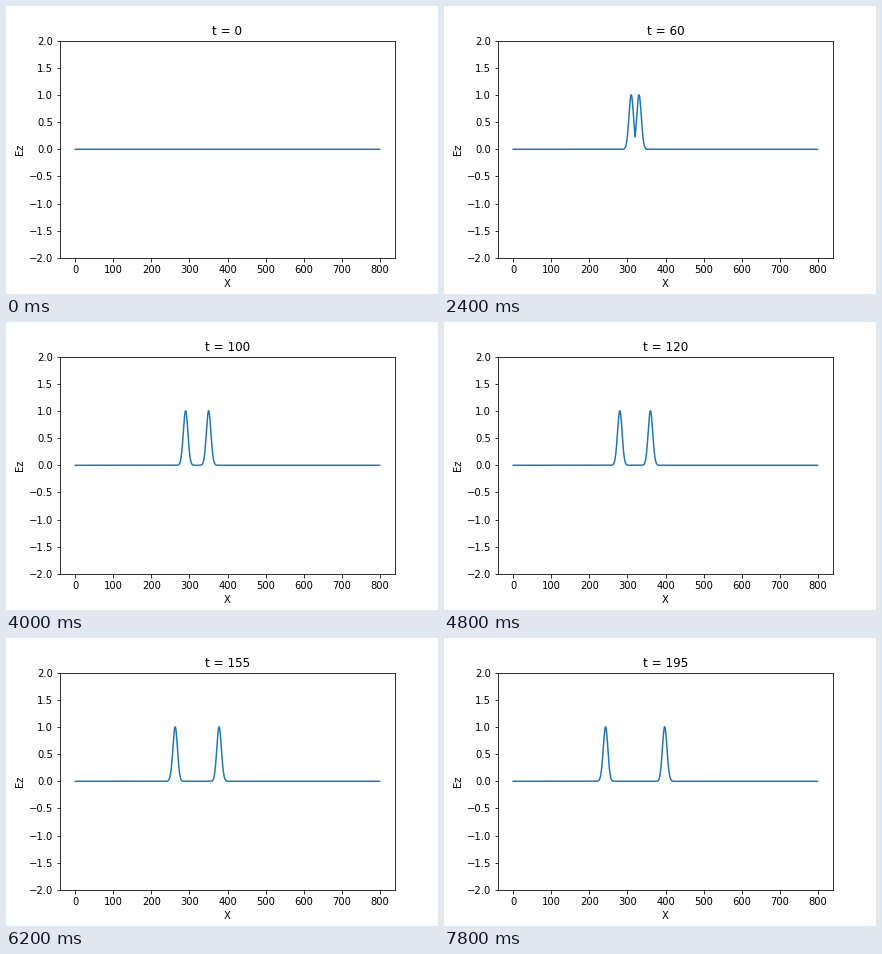
A matplotlib script that plays this animation: 432 px wide and 288 px high, repeating every 8 s.

```python
import numpy as np
import matplotlib.pyplot as plt
from matplotlib.animation import FuncAnimation

CELLS = 800        # grid size
SOURCE = 320       # cell where the pulse is injected
T0, SPREAD = 40, 12
STRIDE = 5         # time steps per frame
FRAMES = 40


def simulate():
    """1D FDTD run with a soft Gaussian source; one Ez row per frame."""
    ez = np.zeros(CELLS)
    hy = np.zeros(CELLS)
    rows = []
    for t in range(FRAMES * STRIDE):
        ez[1:] += 0.5 * (hy[:-1] - hy[1:])
        ez[SOURCE] += np.exp(-0.5 * ((T0 - t) / SPREAD) ** 2)
        hy[:-1] += 0.5 * (ez[:-1] - ez[1:])
        if t % STRIDE == 0:
            rows.append(ez.copy())
    return rows


plt.rcParams.update({
    "font.family": "DejaVu Sans",
    "font.size": 10,
    "figure.subplot.bottom": 0.125,
})

fields = simulate()
fig, ax = plt.subplots(figsize=(6, 4), dpi=72)
line, = ax.plot(np.arange(CELLS), fields[0], color="#1f77b4", lw=1.5)
ax.set_ylim(-2, 2)
ax.set_xlabel("X")
ax.set_ylabel("Ez")
title = ax.set_title("t = 0")


def update(i):
    line.set_ydata(fields[i])
    title.set_text(f"t = {i * STRIDE}")
    return line, title


anim = FuncAnimation(fig, update, frames=FRAMES, interval=200,
                     repeat=True, repeat_delay=0, blit=False)
plt.show()
```
